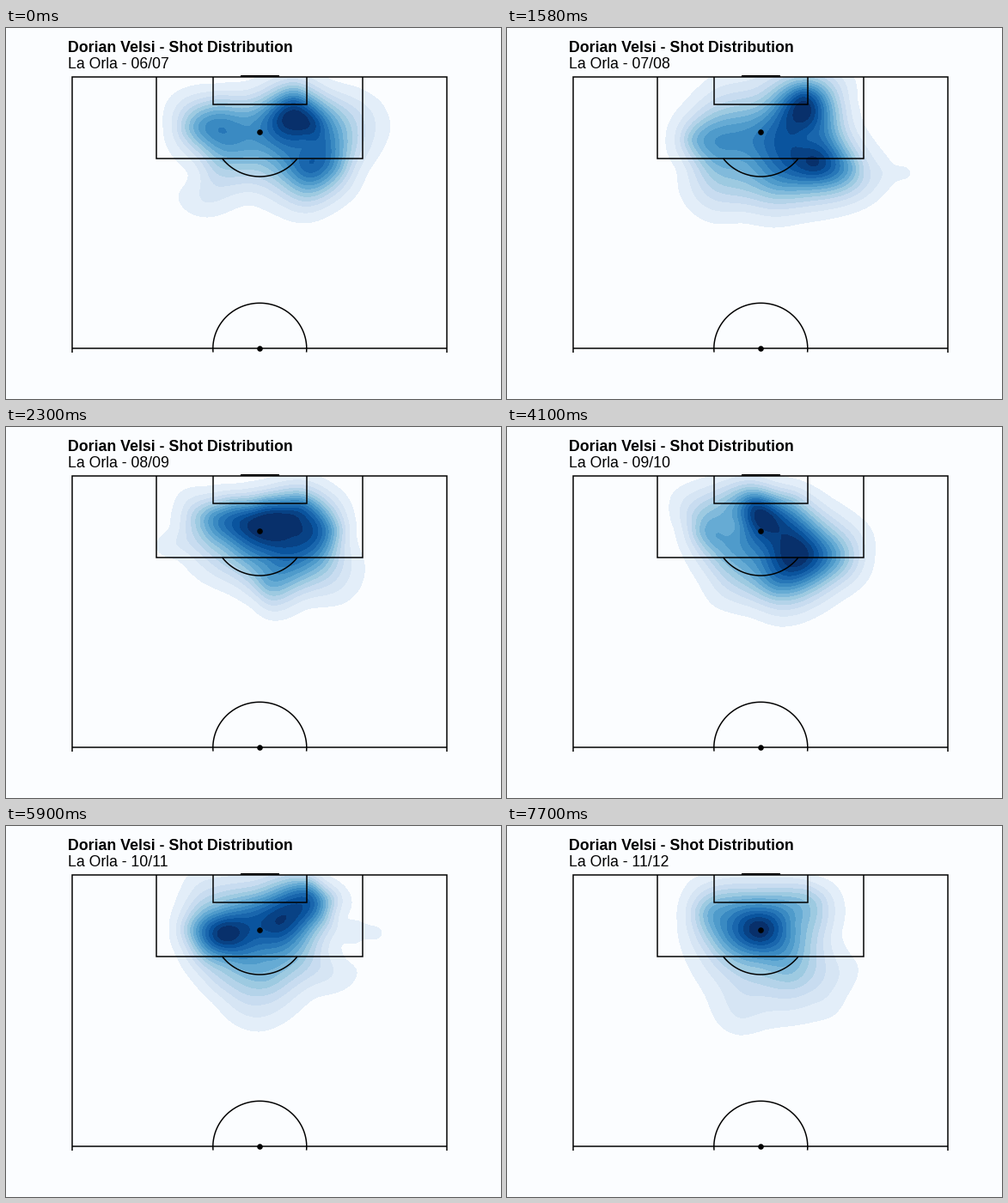
A matplotlib script that plays this animation: 576x432 px, repeating every 8 s.

```python
import numpy as np
import matplotlib.pyplot as plt
from matplotlib.animation import FuncAnimation

W, H, DPI = 576, 432, 72
STEP, LOOP = 100, 8000           # ms
HOLD, LEAD = 1800, 1300          # time per season, time already spent in the first
BACK, INK = "#fbfdff", "black"
BANDS = 15
EDGE = 1 / BANDS                 # density on the outermost contour
TOP = 57                         # goal line

seasons = []


def season(label, outline, inner):
    """outline: points on the outermost contour; inner: (x, y, relative density)."""
    rim = [(x, y, EDGE) for x, y in outline]
    seasons.append((label, np.array(rim + inner, float)))


season("06/07",
       [(192, 80), (215, 68), (245, 65), (280, 62), (380, 61), (410, 70), (437, 88),
        (447, 115), (436, 145), (420, 170), (410, 191), (385, 213), (347, 227),
        (315, 218), (283, 206), (262, 212), (235, 220), (210, 212), (201, 197),
        (208, 183), (212, 170), (195, 150), (183, 115)],
       [(252, 120, .67), (222, 119, .5), (206, 118, .29), (250, 150, .44),
        (240, 166, .25), (233, 197, .15), (285, 118, .61), (339, 107, 1),
        (320, 105, .91), (358, 112, .89), (351, 160, .79), (347, 137, .74),
        (380, 120, .6), (395, 120, .41), (412, 120, .24), (430, 115, .13),
        (350, 185, .5), (348, 202, .26), (300, 150, .48), (283, 182, .19),
        (335, 85, .74), (335, 68, .35), (250, 97, .48), (250, 80, .22),
        (390, 163, .42)])

season("07/08",
       [(185, 128), (190, 108), (205, 88), (222, 70), (238, 57), (403, 57),
        (408, 85), (414, 110), (430, 135), (448, 158), (469, 170), (450, 180),
        (425, 205), (385, 220), (345, 227), (310, 232), (275, 227), (240, 227),
        (213, 212), (200, 188), (197, 165), (188, 148)],
       [(345, 95, 1), (346, 75, .75), (347, 60, .38), (358, 158, .95),
        (335, 158, .86), (350, 128, .79), (385, 163, .69), (405, 163, .41),
        (418, 165, .23), (437, 168, .13), (240, 130, .59), (212, 130, .35),
        (300, 128, .73), (265, 112, .53), (295, 92, .42), (290, 70, .2),
        (312, 185, .5), (305, 207, .23), (240, 185, .28), (237, 211, .13),
        (380, 95, .43), (394, 95, .2), (355, 190, .43), (275, 160, .5)])

season("08/09",
       [(175, 137), (190, 118), (194, 95), (205, 75), (235, 69), (270, 66),
        (300, 61), (375, 63), (398, 83), (406, 105), (408, 130), (417, 160),
        (410, 190), (390, 206), (350, 212), (310, 225), (285, 210), (260, 195),
        (225, 178), (200, 155), (180, 147)],
       [(293, 113, 1), (330, 125, .95), (345, 112, .92), (345, 88, .63),
        (345, 71, .25), (240, 103, .55), (215, 103, .25), (222, 125, .3),
        (200, 135, .14), (267, 107, .8), (265, 85, .35), (302, 86, .52),
        (303, 160, .6), (303, 185, .44), (305, 206, .2), (255, 140, .45),
        (250, 165, .21), (375, 120, .6), (391, 120, .27), (350, 152, .68),
        (372, 160, .4), (397, 170, .15), (350, 185, .28)])

season("09/10",
       [(189, 97), (193, 78), (212, 65), (237, 57), (318, 57), (350, 66),
        (378, 83), (408, 103), (424, 120), (428, 150), (418, 180), (390, 202),
        (360, 221), (318, 232), (285, 222), (240, 207), (222, 180), (205, 150),
        (195, 120)],
       [(295, 105, 1), (288, 88, .78), (283, 71, .35), (333, 154, 1),
        (313, 129, .91), (243, 128, .53), (262, 115, .5), (255, 150, .47),
        (222, 125, .35), (207, 105, .18), (240, 90, .34), (240, 72, .17),
        (325, 95, .6), (335, 80, .27), (350, 120, .68), (375, 120, .37),
        (370, 152, .7), (390, 155, .43), (408, 155, .21), (310, 190, .5),
        (315, 212, .2), (258, 180, .26), (285, 170, .5), (295, 150, .68),
        (358, 187, .38)])

season("10/11",
       [(190, 120), (195, 95), (205, 70), (213, 57), (374, 57), (395, 72),
        (402, 90), (397, 107), (415, 113), (437, 123), (415, 132), (391, 138),
        (395, 155), (408, 172), (398, 187), (360, 200), (325, 228), (295, 239),
        (265, 230), (240, 205), (215, 178), (197, 148)],
       [(255, 126, 1), (290, 123, .84), (318, 117, .92), (340, 90, .86),
        (356, 78, .65), (357, 64, .32), (382, 85, .26), (375, 110, .29),
        (225, 122, .6), (207, 120, .26), (245, 95, .46), (245, 75, .23),
        (290, 85, .5), (290, 68, .24), (355, 115, .55), (340, 140, .5),
        (300, 155, .55), (303, 180, .4), (298, 206, .21), (255, 165, .39),
        (245, 188, .17), (345, 170, .27), (377, 168, .15), (405, 122, .105),
        (225, 152, .32)])

season("11/12",
       [(198, 108), (203, 80), (215, 63), (228, 57), (355, 57), (378, 66),
        (393, 95), (389, 125), (398, 148), (408, 165), (397, 195), (380, 220),
        (335, 232), (300, 237), (270, 243), (248, 232), (232, 200), (212, 165),
        (201, 135)],
       [(293, 120, 1), (274, 118, .85), (313, 118, .83), (293, 100, .75),
        (293, 140, .77), (255, 106, .63), (237, 100, .49), (218, 100, .25),
        (240, 76, .25), (290, 80, .38), (290, 66, .18), (345, 90, .42),
        (338, 114, .5), (366, 86, .25), (350, 69, .19), (376, 115, .16),
        (332, 177, .36), (365, 160, .23), (387, 173, .13), (295, 165, .4),
        (250, 145, .4), (230, 150, .18), (255, 180, .18), (300, 205, .17),
        (270, 224, .13), (355, 205, .14)])


def spline_kernel(ax_, ay, bx, by):
    r2 = (ax_[:, None] - bx) ** 2 + (ay[:, None] - by) ** 2
    return r2 * np.log(r2 + 1e-12)


def density(points, gx, gy):
    """Thin plate spline through the logarithm of the given densities."""
    turn = np.linspace(0, 2 * np.pi, 12, endpoint=False)
    ring = np.column_stack([300 + 230 * np.cos(turn), 135 + 185 * np.sin(turn),
                            np.full(12, np.exp(-9))])
    x, y, value = np.vstack([points, ring]).T
    x, y = (x - 300) / 100, (y - 130) / 100
    u, v = (gx.ravel() - 300) / 100, (gy.ravel() - 130) / 100
    n = len(x)
    plane = np.column_stack([np.ones(n), x, y])
    system = np.block([[spline_kernel(x, y, x, y), plane],
                       [plane.T, np.zeros((3, 3))]])
    coef = np.linalg.solve(system, np.append(np.log(value), np.zeros(3)))
    logs = (spline_kernel(u, v, x, y) @ coef[:n]
            + coef[n] + coef[n + 1] * u + coef[n + 2] * v)
    return np.exp(np.clip(logs, -12, 0)).reshape(gx.shape)


fig = plt.figure(figsize=(W / DPI, H / DPI), dpi=DPI, facecolor=BACK)
ax = fig.add_axes([0, 0, 1, 1])
ax.set_xlim(0, W)
ax.set_ylim(H, 0)
ax.axis("off")

gx, gy = np.meshgrid(np.arange(130, 501, 2.0), np.arange(TOP, 264, 2.0))
levels = np.append(np.arange(1, BANDS) / BANDS, 2)
shades = plt.cm.Blues(np.linspace(.1, 1, BANDS - 1))
clouds = [ax.contourf(gx, gy, density(points, gx, gy), levels=levels,
                      colors=shades, zorder=1) for _, points in seasons]


def line(xs, ys, width=1.5):
    ax.plot(xs, ys, color=INK, lw=width, zorder=3, solid_capstyle="butt",
            solid_joinstyle="miter")


def box(left, right, bottom):
    line([left, left, right, right], [TOP, bottom, bottom, TOP])


def arc(cy, ry, start, end):
    a = np.linspace(start, end, 90)
    line(295.3 + 54.5 * np.cos(a), cy + ry * np.sin(a))


def spot(y):
    ax.plot(295.3, y, "o", color=INK, ms=6.6, mew=0, zorder=4)


HALFWAY = 373.3
line([77, 77, 513, 513], [378, TOP, TOP, 378])
line([77, 513], [HALFWAY, HALFWAY])
box(175, 415, 152)
box(241, 350, 89)
line([272.5, 317.5], [56, 56], 2)
arc(120.5, 52.5, np.arcsin(.6), np.pi - np.arcsin(.6))
arc(HALFWAY, 53, np.pi - .08, 2 * np.pi + .08)
spot(120.5)
spot(HALFWAY)

ax.text(72, 28, "Dorian Velsi - Shot Distribution", family="Liberation Sans",
        weight="bold", size=17.8, color=INK, va="baseline")
subtitle = ax.text(72, 47, "", family="Liberation Sans", size=17.6, color=INK,
                   va="baseline")


def draw(frame):
    current = (frame * STEP + LEAD) // HOLD
    for i, cloud in enumerate(clouds):
        cloud.set_visible(i == current)
    subtitle.set_text("La Orla - " + seasons[current][0])
    return [*clouds, subtitle]


anim = FuncAnimation(fig, draw, frames=LOOP // STEP, interval=STEP,
                     init_func=lambda: draw(0), repeat=True, repeat_delay=0)
plt.show()
```
